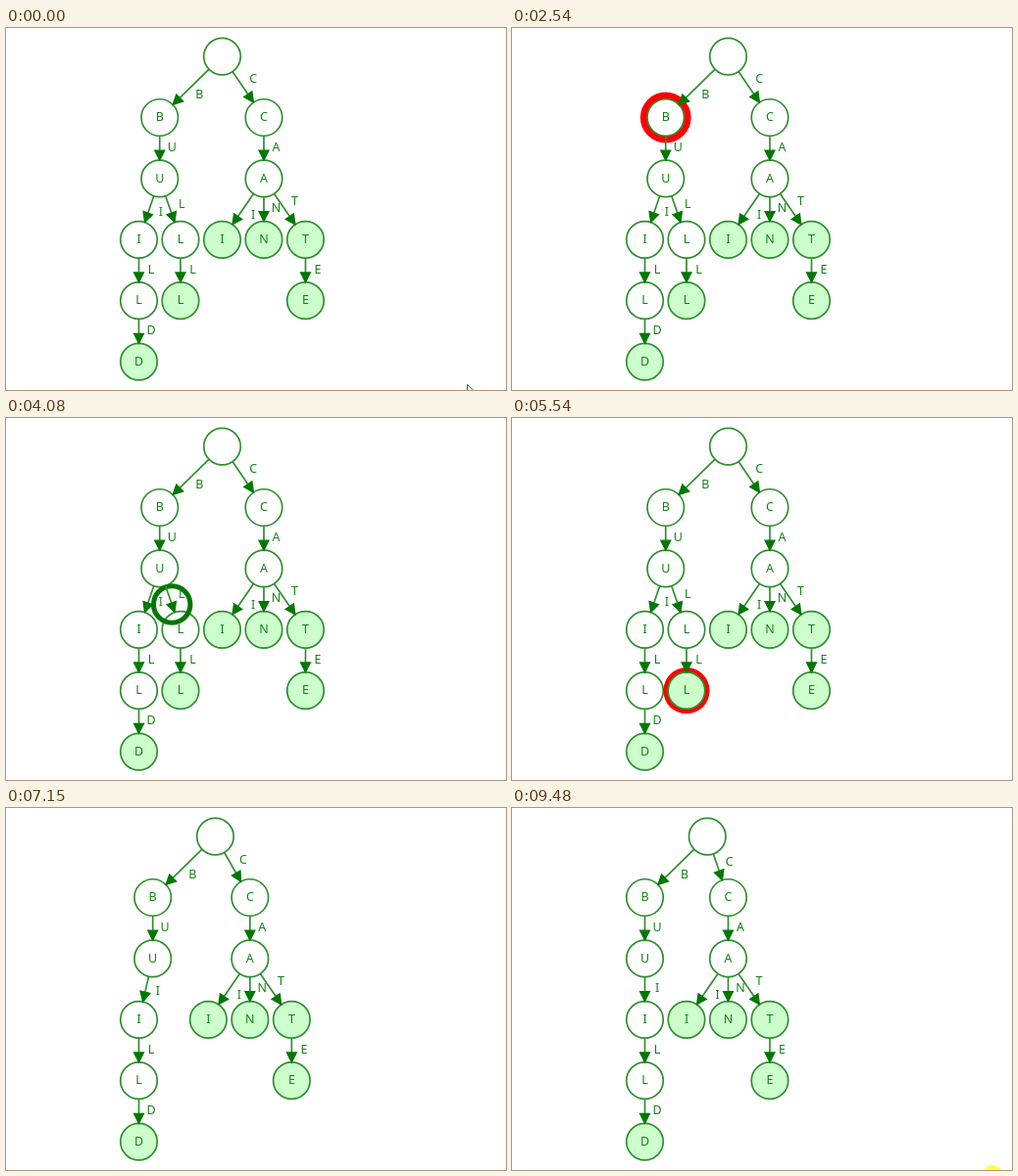
An HTML page with a canvas for the animation above (9570 ms loop, 510 by 370 pixels).

```html
<!DOCTYPE html>
<html lang="en">
<head>
<meta charset="utf-8">
<title>Trie deletion</title>
<style>
  html, body { margin: 0; width: 100%; height: 100%; overflow: hidden; background: #fff; }
  canvas { display: block; }
</style>
</head>
<body>
<canvas id="stage" width="510" height="370"></canvas>
<script>
const ctx = document.getElementById('stage').getContext('2d');
const GREEN = '#007700', SOFT_GREEN = '#2f8f2f', TEXT = '#148214', LEAF = '#ccffcc', RED = '#ff0000';
const LOOP = 9570, START = 1530, BLOCK = 456, TICK = 76.9;
const RADIUS = 18.75, LINE = 1.7;

// column and row are grid units; endColumn is the place after the deletion
const node = (letter, parent, row, column, endColumn, isWord = false) =>
  ({ letter, parent, row, column, endColumn, isWord });

const root = node('', null, 0, 2, 1.5);
const b = node('B', root, 1, 0.5, 0);
const u = node('U', b, 2, 0.5, 0);
const i = node('I', u, 3, 0, 0);
const l = node('L', i, 4, 0, 0);
const d = node('D', l, 5, 0, 0, true);
const upperL = node('L', u, 3, 1, 1);
const lowerL = node('L', upperL, 4, 1, 1, true);
const c = node('C', root, 1, 3, 2);
const a = node('A', c, 2, 3, 2);
const t = node('T', a, 3, 4, 3, true);
const nodes = [root, b, u, i, l, d, upperL, lowerL, c, a,
  node('I', a, 3, 2, 1, true), node('N', a, 3, 3, 2, true), t, node('E', t, 4, 4, 3, true)];
const path = [root, b, u, upperL, lowerL];

const lerp = (from, to, p) => from + (to - from) * p;

function position(n, shift) {
  return { x: 135.5 + 42.5 * lerp(n.column, n.endColumn, shift), y: 29.1 + 62.4 * n.row };
}

function circle(x, y, r) {
  ctx.beginPath();
  ctx.arc(x, y, r, 0, Math.PI * 2);
}

function stroke(color, width) {
  ctx.strokeStyle = color;
  ctx.lineWidth = width;
  ctx.stroke();
}

function fill(color) {
  ctx.fillStyle = color;
  ctx.fill();
}

function label(text, x, y) {
  ctx.fillStyle = TEXT;
  ctx.fillText(text, x, y);
}

function drawNode(n, pos, color, glow) {
  if (glow) {
    circle(pos.x, pos.y, RADIUS + glow);
    fill(RED);
  }
  circle(pos.x, pos.y, RADIUS);
  fill(color);
  stroke(SOFT_GREEN, LINE);
  label(n.letter, pos.x, pos.y + 3.6);
}

function drawEdge(from, to, letter) {
  const length = Math.hypot(to.x - from.x, to.y - from.y);
  const dx = (to.x - from.x) / length, dy = (to.y - from.y) / length;
  const tipX = to.x - dx * RADIUS, tipY = to.y - dy * RADIUS;
  const baseX = tipX - dx * 10, baseY = tipY - dy * 10;
  ctx.beginPath();
  ctx.moveTo(from.x + dx * RADIUS, from.y + dy * RADIUS);
  ctx.lineTo(baseX, baseY);
  stroke(SOFT_GREEN, LINE);
  ctx.beginPath();
  ctx.moveTo(tipX, tipY);
  ctx.lineTo(baseX + dy * 5, baseY - dx * 5);
  ctx.lineTo(baseX - dy * 5, baseY + dx * 5);
  ctx.closePath();
  fill(GREEN);
  stroke(GREEN, 1.25);
  label(letter, (from.x + to.x) / 2 + dy * 12.5, (from.y + to.y) / 2 - dx * 12.5 + 3.1);
}

function pulse(time) {
  const phase = (((time - 5347) / 1690) % 1 + 1) % 1;
  return 3.74 + 5 * (1 - Math.abs(phase * 2 - 1));
}

function highlighted(block) {
  if (block < 0 || block > 11) return null;
  if (block === 11) return upperL;
  if (block >= 8) return lowerL;
  return block % 2 ? null : path[block / 2];
}

function drawCursor() {
  ctx.beginPath();
  ctx.moveTo(470.5, 370);
  ctx.lineTo(470.5, 364.5);
  ctx.lineTo(476.5, 370);
  stroke(GREEN, 1);
}

function drawClick() {
  circle(490, 375.2, 10.4);
  fill('#ffff50');
}

function draw(now) {
  const time = now % LOOP;
  const ticked = 1540 + Math.floor((time - 1537) / TICK) * TICK;
  const progress = (ticked - START) / BLOCK;
  const block = ticked < 1500 ? -1 : Math.floor(progress);
  const shift = Math.min(1, Math.max(0, progress - 12));
  const marked = highlighted(block);

  ctx.fillStyle = '#fff';
  ctx.fillRect(0, 0, 510, 370);
  ctx.font = '12.5px "Noto Sans", "Open Sans", sans-serif';
  ctx.textAlign = 'center';

  const visible = nodes.filter(n =>
    !(n === lowerL && block >= 11) && !(n === upperL && block >= 12));
  for (const n of visible) {
    const isWord = n.isWord && !(n === lowerL && block >= 10);
    drawNode(n, position(n, shift), isWord ? LEAF : '#fff', n === marked ? pulse(ticked) : 0);
  }

  if (block > 0 && block < 8 && block % 2) {
    const step = (block - 1) / 2;
    const from = position(path[step], 0), to = position(path[step + 1], 0);
    circle(lerp(from.x, to.x, progress - block), lerp(from.y, to.y, progress - block), RADIUS);
    stroke(GREEN, 5);
  }

  for (const n of visible) {
    if (n.parent) drawEdge(position(n.parent, shift), position(n, shift), n.letter);
  }

  if (time < 70) drawCursor();
  if (time >= 9480) drawClick();
}

const begin = performance.now();
function frame() {
  draw(performance.now() - begin);
  requestAnimationFrame(frame);
}
frame();
</script>
</body>
</html>
```
